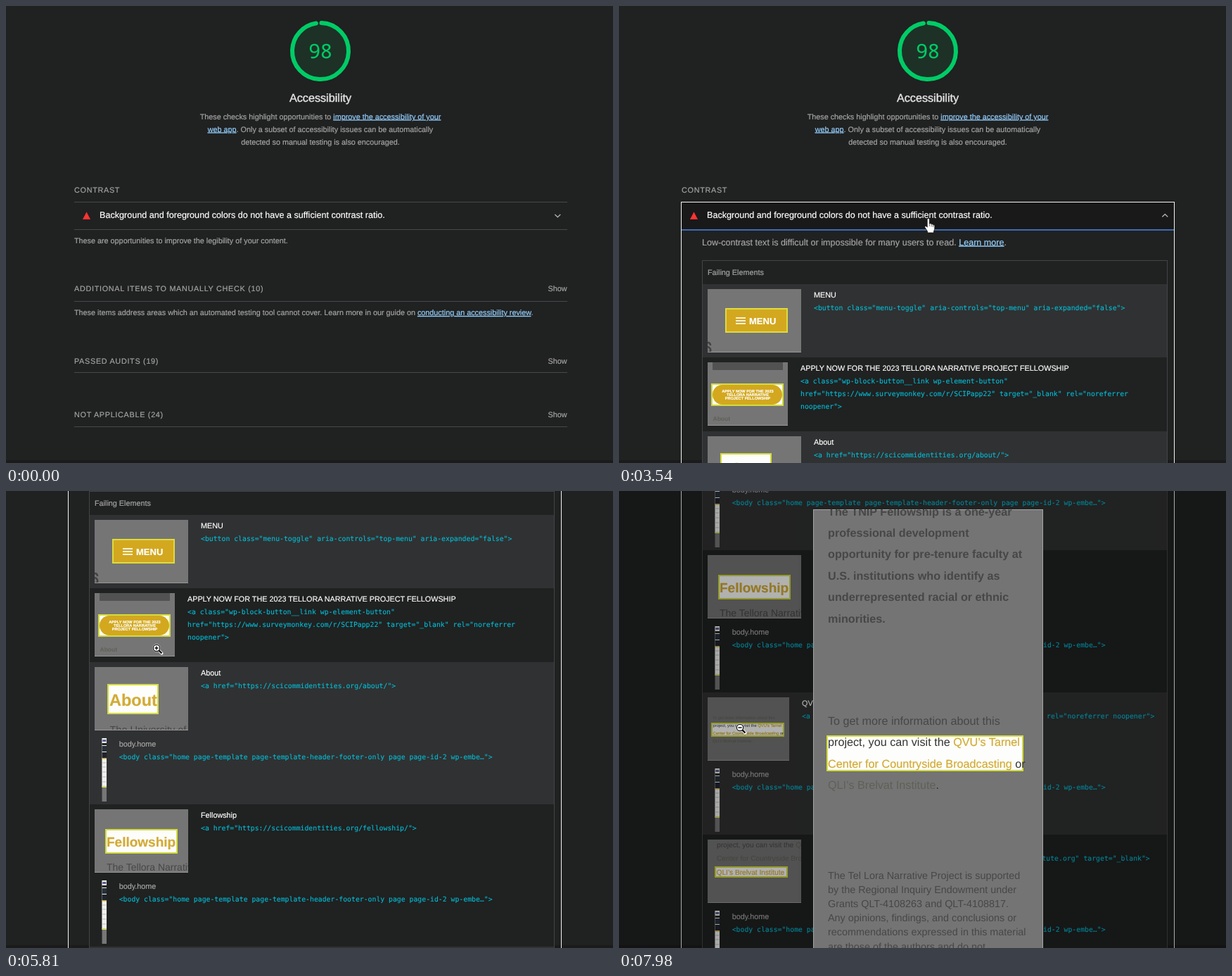
Animation, 863 px wide and 649 px high, one loop 8000 ms. Source, as an HTML page:

```html
<!DOCTYPE html>
<html lang="en">
<head>
<meta charset="utf-8">
<title>Accessibility report</title>
<style>
html, body { margin: 0; width: 100%; height: 100%; overflow: hidden; background: #202121; }
#stage { display: block; width: 863px; height: 649px; }
text {
  font: 10.8px "Liberation Sans", Arial, sans-serif; color: #a4a4a4; fill: currentColor;
  stroke: currentColor; stroke-width: .2; text-rendering: geometricPrecision; white-space: pre;
}
.mid { text-anchor: middle; }
.end { text-anchor: end; }
.caps { letter-spacing: .72px; }
.big { font-size: 12.6px; }
.title { font-size: 16.2px; color: #e4e4e4; stroke-width: .4; }
.score { font: 28px "Noto Sans Mono", "DejaVu Sans Mono", monospace; color: #00cc66; }
.white { color: #fff; }
.link { color: #94d0ff; fill: currentColor; stroke: currentColor; text-decoration: underline; }
.code { font: 9.8px "DejaVu Sans Mono", monospace; color: #00bfd8; stroke-width: .1; }
.bold { font-weight: bold; }
.gold { color: #d2ab35; fill: currentColor; stroke: currentColor; }
.ink { color: #474747; stroke: none; }
.dark { color: #333; stroke: none; }
.faint { color: #606058; fill: currentColor; stroke: none; }
.mark { fill: #fdfdfb; stroke: #d3dc3c; stroke-width: 2; }
.rule { stroke: #474849; }
.chev { fill: none; stroke: #b4b4b4; stroke-width: 1.2; }

/* One clock: 8 s, 1% = 80 ms */
.page, .cursor, .ring { animation: 8s linear infinite; }
.step { animation: 8s step-end infinite; }
.page { animation-name: scroll; }
.cursor { animation-name: travel; }
.ring { animation-name: ripple; transform-origin: 441px 303px; }
.closed { animation-name: closed; }
.open { animation-name: open; }
.hover { animation-name: hover; }
.flat { animation-name: flat; }
.arrow { animation-name: arrow; }
.hand { animation-name: hand; }
.zoom { animation-name: zoom; }
.plus { animation-name: plus; }
.popup { animation-name: popup; }

@keyframes scroll {
  0% { transform: translate(0, 0); animation-timing-function: step-end; }
  37.75% { transform: translate(-8px, 0); }
  65.5% { transform: translate(-8px, 0); animation-timing-function: ease-in-out; }
  70.25%, 75% { transform: translate(-8px, -361px); animation-timing-function: ease-in-out; }
  80%, 83.5% { transform: translate(-8px, -541px); animation-timing-function: ease-in-out; }
  88.5%, 100% { transform: translate(-8px, -722px); }
}
@keyframes travel {
  0%, 7.375% { transform: translate(846px, 315px); }
  10% { transform: translate(790px, 255px); }
  13% { transform: translate(680px, 231px); animation-timing-function: ease-out; }
  16.75%, 17.5% { transform: translate(551px, 262px); animation-timing-function: ease-in-out; }
  23.5%, 50% { transform: translate(440px, 302px); animation-timing-function: ease-in-out; }
  57.375%, 60.75% { transform: translate(186px, 438px); }
  65.25% { transform: translate(187px, 440px); animation-timing-function: ease-in-out; }
  72.625% { transform: translate(214px, 223px); animation-timing-function: ease-in-out; }
  80.25%, 81.125% { transform: translate(216px, 318px); animation-timing-function: ease-in-out; }
  89.625% { transform: translate(177px, 386px); }
  91.125%, 91.875% { transform: translate(181px, 391px); animation-timing-function: ease-in-out; }
  94.125%, 96.375% { transform: translate(165px, 329px); }
  97.875%, 100% { transform: translate(172px, 336px); }
}
@keyframes ripple {
  0%, 36.1% { opacity: 0; transform: scale(1); }
  36.12% { opacity: .8; transform: scale(1); }
  44.25%, 100% { opacity: 0; transform: scale(2.2); }
}
@keyframes closed { 0% { visibility: visible; } 37.75%, 100% { visibility: hidden; } }
@keyframes open { 0% { visibility: hidden; } 37.75%, 100% { visibility: visible; } }
@keyframes hover { 0% { opacity: 0; } 36.125% { opacity: 1; } 51.5%, 100% { opacity: 0; } }
@keyframes flat { 0% { opacity: 0; } 80.2% { opacity: 1; } 81.1%, 100% { opacity: 0; } }
@keyframes arrow {
  0% { opacity: 0; } 7.375% { opacity: 1; } 19.8% { opacity: 0; } 51.5% { opacity: 1; }
  55.5% { opacity: 0; } 88.5% { opacity: 1; } 92.4%, 100% { opacity: 0; }
}
@keyframes hand { 0% { opacity: 0; } 19.8% { opacity: 1; } 51.5%, 100% { opacity: 0; } }
@keyframes zoom { 0% { opacity: 0; } 55.5% { opacity: 1; } 88.5% { opacity: 0; } 92.4%, 100% { opacity: 1; } }
@keyframes plus { 0% { opacity: 1; } 99.74%, 100% { opacity: 0; } }
@keyframes popup { 0% { opacity: 0; } 99.74%, 100% { opacity: 1; } }
</style>
</head>
<body>
<svg id="stage" viewBox="0 0 863 649"></svg>
<script>
const esc = s => s.replace(/&/g, "&amp;").replace(/</g, "&lt;").replace(/>/g, "&gt;");
const text = (x, y, s, cls = "", size) =>
  `<text x="${x}" y="${y}" class="${cls}"${size ? ` style="font-size:${size}px"` : ""}>${s}</text>`;
const span = (s, cls) => `<tspan class="${cls}">${s}</tspan>`;
const link = s => span(s, "link");
const rect = (x, y, w, h, attrs) => `<rect x="${x}" y="${y}" width="${w}" height="${h}" ${attrs}/>`;
const fill = (x, y, w, h, color) => rect(x, y, w, h, `fill="${color}"`);
const mark = (x, y, w, h) => rect(x, y, w, h, 'class="mark"');
const rule = y => `<path class="rule" d="M97 ${y}H798"/>`;
const clip = (x, y, w, h, body) => `<svg x="${x}" y="${y}" width="${w}" height="${h}">${body}</svg>`;

const center = "QVU’s Tarnel Center for Countryside Broadcasting";
const institute = "QLI’s Brelvat Institute";

function gauge() {
  const length = 2 * Math.PI * 40, stroke = 6;
  const arc = length * .98 - stroke / 2;
  const turn = stroke / 4 / length * 360 - 90;
  return `<circle cx="447" cy="64" r="40" fill="#00cc66" fill-opacity=".09"/>
    <circle cx="447" cy="64" r="40" fill="none" stroke="#00cc66" stroke-width="${stroke}" stroke-linecap="round"
      stroke-dasharray="${arc} ${length}" transform="rotate(${turn} 447 64)"/>` +
    text(447, 74, "98", "mid score");
}

function header() {
  return gauge() +
    text(447, 136, "Accessibility", "mid title") +
    text(447, 160.5, "These checks highlight opportunities to " + link("improve the accessibility of your"), "mid") +
    text(447, 178.5, link("web app") + ". Only a subset of accessibility issues can be automatically", "mid") +
    text(447, 196.5, "detected so manual testing is also encouraged.", "mid") +
    text(97, 265, "CONTRAST", "caps") +
    rect(97, 279, 701, 39, 'fill="#19191a" class="step hover"') +
    rule(278.5) + rule(317.5) +
    `<path d="M114.5 292.5 120 303H109Z" fill="#ff3333"/>` +
    text(133, 301, "Background and foreground colors do not have a sufficient contrast ratio.", "big white");
}

function closedPart() {
  const section = (y, title) => text(97, y, title, "caps") + text(797.5, y, "Show", "end");
  return `<g class="step closed"><path class="chev" d="M780.3 296l4 3.8 4-3.8"/>` +
    text(97, 336.5, "These are opportunities to improve the legibility of your content.") +
    section(405, "ADDITIONAL ITEMS TO MANUALLY CHECK (10)") + rule(419.5) +
    text(97, 439, "These items address areas which an automated testing tool cannot cover. Learn more in our guide on " +
      link("conducting an accessibility review") + ".") +
    section(507.5, "PASSED AUDITS (19)") + rule(520.5) +
    section(584, "NOT APPLICABLE (24)") + rule(597.5) + "</g>";
}

// Thumbnail drawings, each in its own box
const thumbs = {
  menu: rect(26, 28, 87, 33, 'fill="#d3a81f" stroke="#dedc3c" stroke-width="2"') +
    `<path d="M40 41h14M40 45h14M40 49h14" stroke="#f6f0d8" stroke-width="2"/>` +
    text(59, 50, "MENU", "bold white", 13) +
    `<path d="M0 76q4 0 4 4M0 82q5 2 4 6-1 2-4 2" fill="none" stroke="#444" stroke-width="2.5"/>`,
  apply: fill(7, 0, 100, 11, "#525252") + mark(6, 31, 101, 30) +
    rect(7, 32, 99, 28, 'rx="14" fill="#d3a81f"') +
    text(57, 42.5, "APPLY NOW FOR THE 2023", "mid bold white", 5.6) +
    text(57, 47.7, "TELLORA NARRATIVE", "mid bold white", 5.6) +
    text(57, 52.8, "PROJECT FELLOWSHIP", "mid bold white", 5.6) +
    text(7.5, 83, "About", "bold faint", 8.5),
  about: mark(19, 25, 71, 41) + text(21, 55, "About", "bold gold", 23.5) +
    text(21.5, 94, "The University of", "ink", 14.5),
  fellow: mark(16, 29, 101, 33) + text(17, 53, "Fellowship", "bold gold", 19) +
    text(17, 87, "The Tellora Narrative", "ink", 14),
  center: text(7, 31, "To get more information about this", "faint", 5.87) + mark(6, 37, 102, 18) +
    text(7.5, 42, "project, you can visit the " + span("QVU’s Tarnel", "gold"), "dark", 5.8) +
    text(7.5, 53, span("Center for Countryside Broadcasting", "gold") + " or", "dark", 5.8) +
    text(7, 64, institute + ".", "faint", 5.87),
  institute: text(13, 10.5, "project, you can visit the " + span("QVU’s", "faint"), "ink", 10.2) +
    text(13, 30, "Center for Countryside Broadcasting", "faint", 10.2) +
    mark(11, 39, 102, 14) + text(12.5, 49.5, institute, "gold", 10.2)
};

const bodyCode = '<body class="home page-template page-template-header-footer-only page page-id-2 wp-embe…">';
const bodyStrip = fill(0, 0, 7, 90, "#777") + fill(0, 0, 7, 70, "#f2f2f0") + fill(1, 2, 5, 3, "#56618a") +
  fill(0, 7, 7, 3, "#222") + fill(0, 11, 7, 8, "#27313a") + fill(0, 20, 7, 8, "#20242b") +
  fill(0, 28, 7, 1.5, "#c9a63a") + [34, 40, 47, 54, 61].map(y => fill(1, y, 5, 2, "#d6d6d4")).join("") +
  fill(0, 68, 7, 1.5, "#d3dc3c");

const rows = [
  { top: 395, height: 104, width: 133, art: "menu", title: "MENU",
    code: ['<button class="menu-toggle" aria-controls="top-menu" aria-expanded="false">'] },
  { top: 499, height: 105, width: 114, art: "apply", title: "APPLY NOW FOR THE 2023 TELLORA NARRATIVE PROJECT FELLOWSHIP",
    code: ['<a class="wp-block-button__link wp-element-button"',
      'href="https://www.surveymonkey.com/r/SCIPapp22" target="_blank" rel="noreferrer', 'noopener">'] },
  { top: 604, height: 202, width: 133, art: "about", title: "About",
    code: ['<a href="https://scicommidentities.org/about/">'] },
  { top: 806, height: 202, width: 133, art: "fellow", title: "Fellowship",
    code: ['<a href="https://scicommidentities.org/fellowship/">'] },
  { top: 1008, height: 202, width: 116, art: "center", title: center,
    code: ['<a href="https://knightcenter.jrn.msu.edu" target="_blank" rel="noreferrer noopener">'] },
  { top: 1210, height: 202, width: 133, art: "institute", title: institute,
    code: ['<a rel="noreferrer noopener" href="https://metcalfinstitute.org" target="_blank">'] }
];

function row({ top, width, height, art, title, code }) {
  const x = 126 + width + 18;
  let out = clip(126, top + 7, width, 90, fill(0, 0, width, 90, "#757575") + thumbs[art] +
    `<path d="M0 89.5H${width}" stroke="#999"/>`);
  out += text(x, top + 19, title, "white");
  code.forEach((line, i) => out += text(x, top + 37 + i * 18, esc(line), "code"));
  if (height > 150) {
    out += clip(136.3, top + 108, 6.7, 90, bodyStrip) +
      text(160.7, top + 119.5, "body.home") + text(160.7, top + 138, esc(bodyCode), "code");
  }
  return out;
}

function openPart() {
  const stripes = rows.map((r, i) => fill(118, r.top, 662, r.height, i % 2 ? "#202121" : "#303132")).join("");
  return `<g class="step open" transform="translate(8 0)"><path class="chev" d="M772.3 299.5l4-3.8 4 3.8"/>` +
    rect(88.5, 278.5, 701, 1200, 'fill="none" stroke="#f4f4f4"') +
    `<path d="M89 318H789" stroke="#3f7fdc" stroke-width="1.6"/>` +
    text(118, 339.5, "Low-contrast text is difficult or impossible for many users to read. " + link("Learn more") + ".", "big") +
    text(126, 381.5, "Failing Elements") + stripes +
    rect(118, 395, 662, 1017, 'fill="#292a2b" class="step flat"') +
    rect(118.5, 361.5, 661, 1051, 'fill="none" stroke="#434445"') +
    rows.map(row).join("") + "</g>";
}

function popup() {
  const lines = (y, gap, list, cls, size) => list.map((s, i) => text(21, y + i * gap, s, cls, size)).join("");
  return `<g class="step popup">` + fill(0, 0, 863, 649, "rgba(0,0,0,.3)") +
    clip(276, 26, 327, 640, rect(.5, .5, 326, 660, 'fill="#747474" stroke="#a6a6a6"') +
      lines(8.5, 30.4, ["The TNIP Fellowship is a one-year", "professional development",
        "opportunity for pre-tenure faculty at", "U.S. institutions who identify as",
        "underrepresented racial or ethnic", "minorities."], "bold ink", 16.2) +
      text(21, 305.5, "To get more information about this", "ink", 16.2) + mark(20, 322, 278, 49) +
      lines(336, 30.6, ["project, you can visit the " + span("QVU’s Tarnel", "gold"),
        span("Center for Countryside Broadcasting", "gold") + " or",
        span(institute, "faint") + "."], "dark", 16.2) +
      lines(524.5, 20.2, ["The Tel Lora Narrative Project is supported", "by the Regional Inquiry Endowment under",
        "Grants QLT-4108263 and QLT-4108817.", "Any opinions, findings, and conclusions or",
        "recommendations expressed in this material", "are those of the authors and do not"], "ink", 14.4)) + "</g>";
}

const cursor = `<g class="cursor">
  <path class="step arrow" d="M0 0V16.5L3.8 13 6.3 18.7 8.9 17.5 6.5 12H11.8Z" fill="#fff" stroke="#111" stroke-width=".8"/>
  <g class="step hand"><path d="M-1.8 1.5q0-2 1.6-2t1.6 2V7q2.2-.8 2.7.8 2-.6 2.4.9 2.3-.5 2.3 1.8V14q0 2-1.2 3.5V20H-1.5V18L-5 12.5q-.8-1.8.8-2.1 1.2 0 2.4 1.8Z"
    fill="#fff" stroke="#111" stroke-width=".8"/>
    <path d="M1.4 7v4M4.1 8v3.5M6.5 9v3" stroke="#333" stroke-width=".7"/></g>
  <g class="step zoom" fill="none">
    <path d="M3.3 3.3 7.5 7.5" stroke="#fff" stroke-width="4" stroke-linecap="round"/>
    <circle r="5.7" fill="#fff"/><circle r="4.7" stroke="#111" stroke-width="1.3"/>
    <path d="M3.3 3.3 7.5 7.5" stroke="#111" stroke-width="2.4"/>
    <path d="M-2.6 0H2.6" stroke="#111" stroke-width="1.5"/>
    <path class="step plus" d="M0-2.6V2.6" stroke="#111" stroke-width="1.5"/></g>
</g>`;

document.getElementById("stage").innerHTML =
  fill(0, 645, 863, 4, "#1b1b1c") +
  `<g class="page">${header()}${closedPart()}${openPart()}</g>` +
  `<circle class="ring" cx="441" cy="303" r="8" fill="none" stroke="#fff"/>` +
  popup() + cursor;
</script>
</body>
</html>
```
